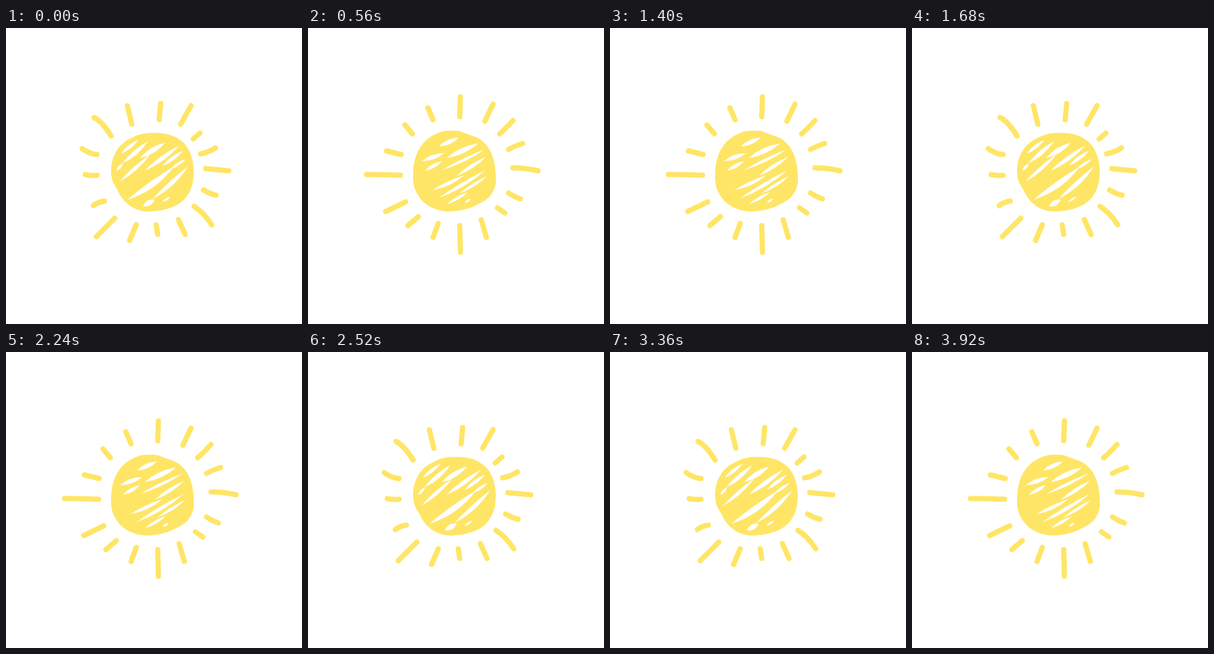
Animation, 400 px wide and 400 px high, one loop 4.2 s. Source, as an HTML page:

```html
<!DOCTYPE html>
<html lang="en">
<head>
<meta charset="utf-8">
<title>Scribbled sun</title>
<style>
  html, body { margin: 0; width: 100%; height: 100%; overflow: hidden; background: #fff; }
  svg { display: block; width: 100vw; height: 100vh; }
  .disc { fill: #ffe566; }
  .rays { fill: none; stroke: #ffe566; stroke-width: 7; stroke-linecap: round; stroke-linejoin: round; }
  .gaps { fill: #fff; }
</style>
</head>
<body>
<svg id="stage" viewBox="0 0 400 400"></svg>
<script>
const HOLD = 280;
const stage = document.getElementById('stage');

// Each gap: x1, y1, x2, y2, thickness, bow
const poses = [
  {
    disc: 'M142 194C142 172 153 156 169 149C181 142 193 141 208 142C227 143 243 153 249 169C253 179 255 193 253 205C251 221 242 235 227 241C216 246 203 248 190 248C174 247 161 238 153 224C150 215 142 210 142 194Z',
    rays: 'M119 121Q130 126 142 146M164 105L170 130M209 102L207 124M250 105L236 130M262 142L253 150M283 162Q274 168 263 170M270 190L301 193M267 219Q275 224 284 226M254 241Q268 250 278 266M233 259L242 279M203 266L205 279M176 266L167 287M147 257L122 282M133 234Q124 235 118 240M123 199Q115 200 107 198M103 163Q112 170 123 171',
    gaps: [
      [155, 170, 179, 151, 5, 0], [157, 183, 192, 153, 6, 1],
      [149, 193, 158, 183, 4, 0], [153, 208, 195, 171, 5, 1],
      [181, 176, 215, 155, 7, 0], [187, 193, 234, 159, 6, 1],
      [212, 186, 239, 166, 5, 0], [164, 232, 227, 187, 8, 5],
      [185, 241, 201, 232, 7, 0], [198, 231, 246, 187, 6, 3],
      [222, 191, 243, 177, 4, 0], [211, 235, 222, 228, 3, 0]
    ]
  },
  {
    disc: 'M142 196C142 174 150 158 166 149C178 141 193 139 208 141C229 144 243 156 249 171C254 183 254 199 252 210C248 226 239 237 224 242C211 247 197 249 182 247C166 244 154 234 148 220C143 211 142 204 142 196Z',
    rays: 'M207 94L206 122M250 104L238 128M270 134L256 147M286 159L267 167M273 190L300 192M269 221L285 228M255 242L272 258M234 259L241 281M204 267L206 297M176 265L168 285M148 256L129 274M132 235L112 244M91 198L124 199M105 165L125 171M125 126L141 144M163 107L170 127',
    gaps: [
      [155, 175, 181, 157, 6, 0], [157, 190, 198, 153, 5, 1],
      [150, 202, 177, 185, 4, 0], [184, 177, 223, 154, 6, 1],
      [163, 210, 211, 179, 5, 0], [202, 188, 238, 163, 5, 1],
      [168, 227, 231, 190, 6, 3], [179, 237, 207, 221, 5, 0],
      [194, 237, 244, 195, 5, 2], [217, 192, 242, 176, 4, 0],
      [211, 235, 224, 225, 3, 0]
    ]
  },
  {
    disc: 'M142 201C142 180 147 161 163 149C174 141 185 138 196 139C207 138 212 143 220 145C235 149 244 159 249 172C253 183 254 195 254 207C253 219 247 229 236 235C222 243 207 248 189 248C171 247 155 239 147 223C143 216 142 209 142 201Z',
    rays: 'M206 93L205 120M250 103L239 126M277 125Q267 136 259 143M290 156Q280 159 271 164M277 189Q294 189 311 193M271 223Q278 228 287 231M256 243L266 250M234 259L241 283M205 267L206 303M176 264L169 283M149 255L135 267M132 235L105 248M79 198Q102 198 125 199M106 166L126 171M131 131L141 143M162 108L169 124',
    gaps: [
      [154, 180, 184, 169, 6, 0], [158, 193, 181, 180, 5, 0],
      [177, 160, 204, 148, 6, 0], [187, 176, 230, 156, 7, 0],
      [181, 192, 239, 164, 4, 1], [168, 219, 211, 199, 5, 2],
      [201, 200, 241, 174, 5, 0], [176, 230, 240, 192, 5, 2],
      [188, 238, 216, 222, 4, 0], [204, 224, 242, 200, 4, 1],
      [212, 236, 220, 231, 3, 0]
    ]
  }
];

function sliver([x1, y1, x2, y2, w, bow]) {
  const len = Math.hypot(x2 - x1, y2 - y1);
  const nx = (y1 - y2) / len, ny = (x2 - x1) / len;
  const bend = d => `${(x1 + x2) / 2 + nx * d} ${(y1 + y2) / 2 + ny * d}`;
  return `M${x1} ${y1}Q${bend(bow - w)} ${x2} ${y2}Q${bend(bow + w)} ${x1} ${y1}Z`;
}

const part = (name, d) => `<path class="${name}" d="${d}"/>`;

stage.innerHTML = poses.map(p =>
  `<g>${part('disc', p.disc)}${part('gaps', p.gaps.map(sliver).join(''))}${part('rays', p.rays)}</g>`
).join('');
const suns = [...stage.children];

function draw(t) {
  const now = Math.floor(t / HOLD) % suns.length;
  suns.forEach((sun, i) => sun.setAttribute('display', i === now ? 'inline' : 'none'));
}

const start = performance.now();
function tick() {
  draw(performance.now() - start);
  requestAnimationFrame(tick);
}
tick();
</script>
</body>
</html>
```
